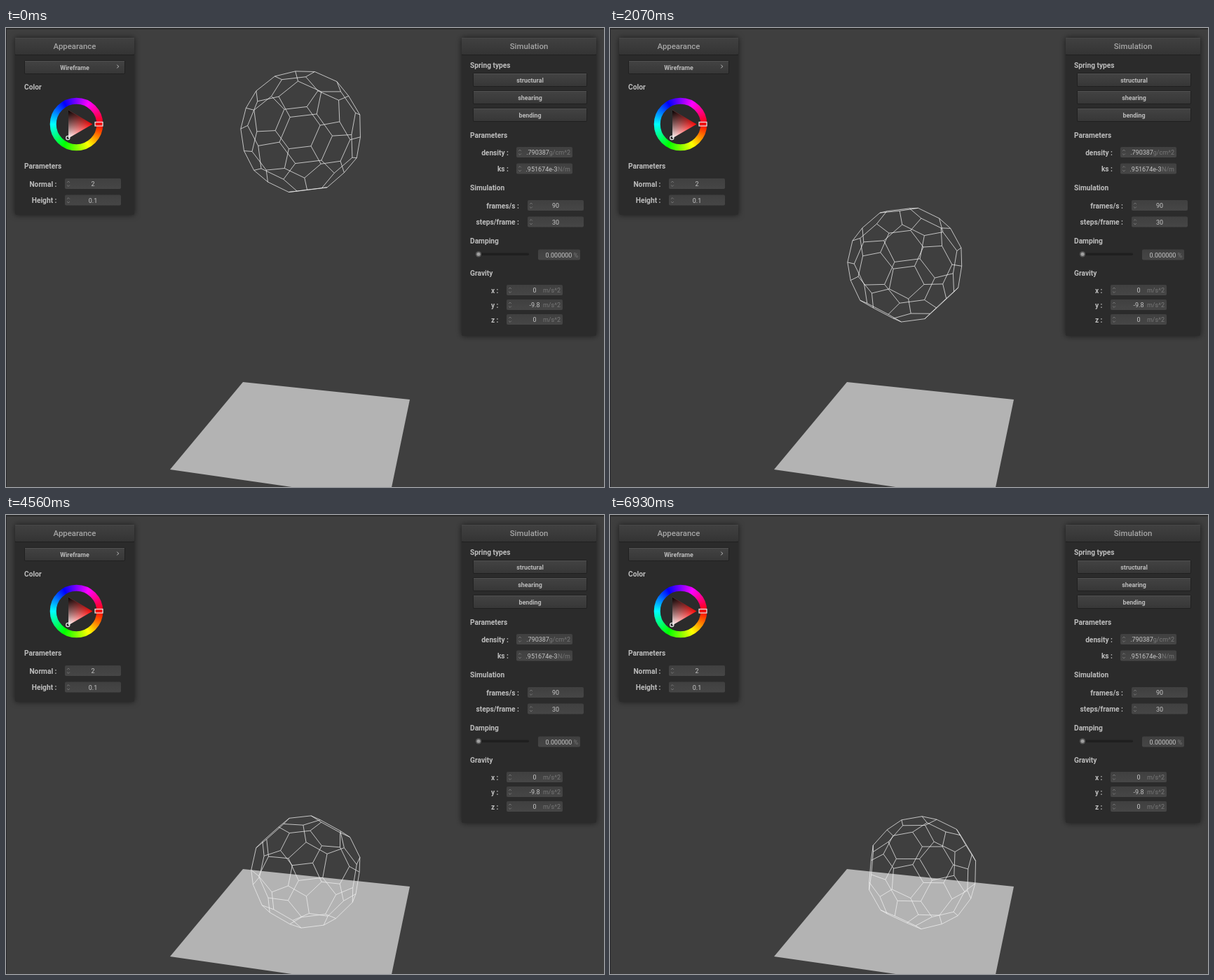
An HTML page with a canvas for the animation above (6960 ms loop, 853 px wide and 656 px high).

```html
<!DOCTYPE html>
<html lang="en">
<head>
<meta charset="utf-8">
<title>Falling wireframe ball</title>
<style>
  html, body { margin: 0; width: 100%; height: 100%; overflow: hidden; background: #3f3f3f; }
  canvas { position: absolute; left: 0; top: 0; }
</style>
</head>
<body>
<canvas id="scene" width="853" height="656"></canvas>
<canvas id="ball" width="853" height="656"></canvas>
<script>
const g = document.getElementById('scene').getContext('2d');
const b = document.getElementById('ball').getContext('2d');
const LOOP = 6960, TAU = Math.PI * 2;

// ---------- static interface ----------
function text(s, x, y, { size = 10.2, weight = 'bold', color = '#bdbdbd', align = 'left' } = {}) {
  g.font = `${weight} ${size}px Roboto, "Open Sans", sans-serif`;
  g.textAlign = align;
  g.textBaseline = 'alphabetic';
  g.fillStyle = color;
  g.fillText(s, x, y + size * 0.35);
}

function rect(x, y, w, h, fill, radius = 0) {
  g.beginPath();
  g.roundRect(x, y, w, h, radius);
  g.fillStyle = fill;
  g.fill();
}

function shade(y, h, top, bottom) {
  const s = g.createLinearGradient(0, y, 0, y + h);
  s.addColorStop(0, top);
  s.addColorStop(1, bottom);
  return s;
}

function poly(points) {
  g.beginPath();
  points.forEach(([x, y]) => g.lineTo(x, y));
}

function panel(x, y, w, h, title) {
  g.save();
  g.shadowColor = 'rgba(0,0,0,.6)';
  g.shadowBlur = 9;
  rect(x, y, w, h, '#2b2b2b', 2);
  g.restore();
  rect(x, y, w, 24, shade(y, 24, '#414141', '#343434'), 2);
  rect(x, y, w, 1, '#484848');
  rect(x, y + 24, w, 1, '#1f1f1f');
  text(title, x + w / 2, y + 12.5, { size: 11.4, weight: 500, color: '#a6a6a6', align: 'center' });
}

function button(x, y, w, label) {
  rect(x - 1, y - 1, w + 2, 20, '#202020', 2);
  rect(x, y, w, 18, shade(y, 18, '#434343', '#373737'), 1);
  rect(x, y, w, 1, '#505050');
  text(label, x + w / 2, y + 9.5, { size: 8.9, color: '#bcbcbc', align: 'center' });
}

function chevron(x, y, dx, dy, s) {
  const h = s / 2;
  g.beginPath();
  g.moveTo(x - dx * h - dy * s, y - dy * h - dx * s);
  g.lineTo(x + dx * h, y + dy * h);
  g.lineTo(x - dx * h + dy * s, y - dy * h + dx * s);
  g.stroke();
}

function field(x, y, w, value, valueX, unit = '', spinner = true) {
  rect(x, y, w, 15, shade(y, 15, '#404040', '#464646'), 2);
  if (spinner) {
    g.strokeStyle = '#808080';
    g.lineWidth = 0.8;
    chevron(x + 5, y + 5, 0, -1, 1.9);
    chevron(x + 5, y + 10.5, 0, 1, 1.9);
  }
  text(unit, x + w - 3, y + 8, { size: 9, weight: 400, color: '#777', align: 'right' });
  text(value, valueX, y + 8, { size: 9, weight: 400, color: '#c6c6c6', align: 'center' });
}

const label = (s, x, y) => text(s, x, y, { align: 'right' });

function colorWheel(cx, cy) {
  const hue = g.createConicGradient(0, cx, cy);
  for (let i = 0; i <= 6; i++) hue.addColorStop(i / 6, `hsl(${i * 60}, 100%, 50%)`);
  g.beginPath();
  g.arc(cx, cy, 33.3, 0, TAU);
  g.strokeStyle = hue;
  g.lineWidth = 9;
  g.stroke();

  const [red, white, black] = [0, 1, 2].map(i =>
    [cx + 23 * Math.cos(i * TAU / 3), cy + 23 * Math.sin(i * TAU / 3)]);
  const mid = [(red[0] + white[0]) / 2, (red[1] + white[1]) / 2];
  for (const [from, to, c1, c2] of [[red, white, '#f00', '#fff'], [mid, black, 'rgba(0,0,0,0)', '#000']]) {
    const fill = g.createLinearGradient(...from, ...to);
    fill.addColorStop(0, c1);
    fill.addColorStop(1, c2);
    poly([red, white, black]);
    g.fillStyle = fill;
    g.fill();
  }
  g.strokeStyle = '#e8e8e8';
  g.lineWidth = 1.2;
  g.beginPath();
  g.arc(88.3, 157, 2.6, 0, TAU);
  g.stroke();
  rect(127, 134.5, 11, 5.5, '#f01010');
  g.strokeRect(127, 134.5, 11, 5.5);
}

function drawScene() {
  rect(0, 0, 853, 656, '#3f3f3f');
  rect(0, 0, 853, 2, '#2b2b2b');
  rect(0, 0, 1, 656, '#25252a');
  poly([[338, 506], [576, 531], [546, 676], [234, 631]]);
  g.fillStyle = '#b3b3b3';
  g.fill();

  panel(13, 14, 170, 253, 'Appearance');
  button(27, 47, 142, 'Wireframe');
  g.strokeStyle = '#bdbdbd';
  g.lineWidth = 1;
  chevron(159.5, 55, 1, 0, 2.4);
  text('Color', 26, 84.5);
  colorWheel(100.5, 137.5);
  text('Parameters', 26, 197.5);
  label('Normal :', 72.5, 223);
  field(84, 215, 80, '2', 124);
  label('Height :', 72.5, 246);
  field(84, 238.5, 80, '0.1', 124);

  panel(650, 14, 192, 426, 'Simulation');
  text('Spring types', 662, 53);
  ['structural', 'shearing', 'bending'].forEach((s, i) => button(667, 65 + i * 25, 161, s));
  text('Parameters', 662, 153);
  label('density :', 717, 178);
  field(728, 170, 80, '.790387', 758.5, 'g/cm^2');
  label('ks :', 717, 201.5);
  field(728, 193.5, 80, '.951674e-3', 764, 'N/m');
  text('Simulation', 662, 228.5);
  label('frames/s :', 732, 254);
  field(744, 246, 80, '90', 784);
  label('steps/frame :', 732, 277);
  field(744, 269.5, 80, '30', 784);
  text('Damping', 662, 304);
  rect(672, 321.5, 74, 3.5, '#1f1f1f', 2);
  g.beginPath();
  g.arc(674, 323.3, 4.2, 0, TAU);
  g.fillStyle = '#555';
  g.fill();
  g.beginPath();
  g.arc(674, 323.3, 2.5, 0, TAU);
  g.fillStyle = '#a0a0a0';
  g.fill();
  field(759, 316.5, 60, '0.000000', 788.5, '%', false);
  text('Gravity', 662, 350);
  [['x', '0'], ['y', '-9.8'], ['z', '0']].forEach(([axis, value], i) => {
    label(axis + ' :', 702.5, 375 + i * 21);
    field(714, 367 + i * 21, 80, value, 754, 'm/s^2');
  });
}

// ---------- truncated icosahedron: x right, y up, z to the viewer, pentagons at both poles ----------
const ico = [[0, 1, 0], [0, -1, 0]];
for (let i = 0; i < 10; i++) {
  const a = i * TAU / 10, r = 2 / Math.sqrt(5);
  ico.push([r * Math.sin(a), (i % 2 ? -1 : 1) / Math.sqrt(5), r * Math.cos(a)]);
}
const near = (p, q) => p !== q && p[0] * q[0] + p[1] * q[1] + p[2] * q[2] > 0.4;
function corner(p, q) {
  const v = p.map((n, i) => 2 * n + q[i]), len = Math.hypot(...v);
  return v.map(n => n / len);
}
const edges = [];
for (const p of ico) for (const q of ico) {
  if (!near(p, q)) continue;
  if (ico.indexOf(p) < ico.indexOf(q)) edges.push([corner(p, q), corner(q, p)]);
  for (const r of ico)
    if (near(p, r) && near(q, r) && ico.indexOf(q) < ico.indexOf(r))
      edges.push([corner(p, q), corner(p, r)]);
}

// ---------- motion ----------
// time, centre x, y on screen, then in degrees: spin round the pole, tilt to the viewer, lean to the left
const keys = [
  [0, 421.5, 150, 2.5, 6.2, 7],
  [360, 421.5, 171.5, 2.5, 6.2, 7],
  [720, 421.5, 202, 2.5, 6.2, 7],
  [1440, 421.5, 275, 2.5, 6.2, 7],
  [2070, 421.5, 337.5, 2.5, 6.2, 7],
  [3060, 421.3, 430.5, 2.5, 6.2, 7],
  [3810, 421.2, 497.5, 2.5, 6.2, 7],
  [3960, 422, 508.8, 3, 6.5, 6.7],
  [5370, 437, 508.8, 7, 7.5, 4],
  [6930, 444.5, 509.8, 21, 7.5, 4.5]
];

// Monotone cubic through the keys
const slope = (i, c) => (keys[i + 1][c] - keys[i][c]) / (keys[i + 1][0] - keys[i][0]);
function tangent(i, c) {
  if (i === 0) return slope(0, c);
  if (i === keys.length - 1) return slope(i - 1, c);
  const m = slope(i - 1, c), n = slope(i, c);
  return m * n > 0 ? 2 * m * n / (m + n) : 0;
}
function pose(t) {
  t = Math.min(t, keys[keys.length - 1][0]);
  let i = 0;
  while (i < keys.length - 2 && t > keys[i + 1][0]) i++;
  const h = keys[i + 1][0] - keys[i][0], u = (t - keys[i][0]) / h, w = 1 - u;
  return [1, 2, 3, 4, 5].map(c =>
    keys[i][c] * w * w * (1 + 2 * u) + keys[i + 1][c] * u * u * (3 - 2 * u) +
    h * u * w * (tangent(i, c) * w - tangent(i + 1, c) * u));
}

// Camera: focal length in pixels, slope of its downward pitch, screen centre
const FOCAL = 915, PITCH = 0.2317, MX = 426.5, MY = 328;

function rotate(p, q, degrees) {
  const a = degrees * TAU / 360, c = Math.cos(a), s = Math.sin(a);
  return [p * c - q * s, p * s + q * c];
}

function drawBall(t) {
  const [cx, cy, spin, tilt, lean] = pose(t);
  const dx = (cx - MX) / FOCAL, dy = (cy - MY) / FOCAL;
  const depth = 11.06 / (1 - PITCH * dy);      // in ball radii
  const project = ([x, y, z]) => {
    [z, x] = rotate(z, x, spin);
    [z, y] = rotate(z, y, -tilt);
    [x, y] = rotate(x, y, lean);
    const s = FOCAL / (depth - z);
    return [MX + (dx * depth + x) * s, MY + (dy * depth - y) * s];
  };
  b.clearRect(0, 0, 853, 656);
  b.beginPath();
  for (const [p, q] of edges) {
    b.moveTo(...project(p));
    b.lineTo(...project(q));
  }
  b.strokeStyle = '#f0f0f0';
  b.lineWidth = 0.75;
  b.stroke();
}

function frame() {
  drawBall(performance.now() % LOOP);
  requestAnimationFrame(frame);
}
drawScene();
frame();
</script>
</body>
</html>
```
